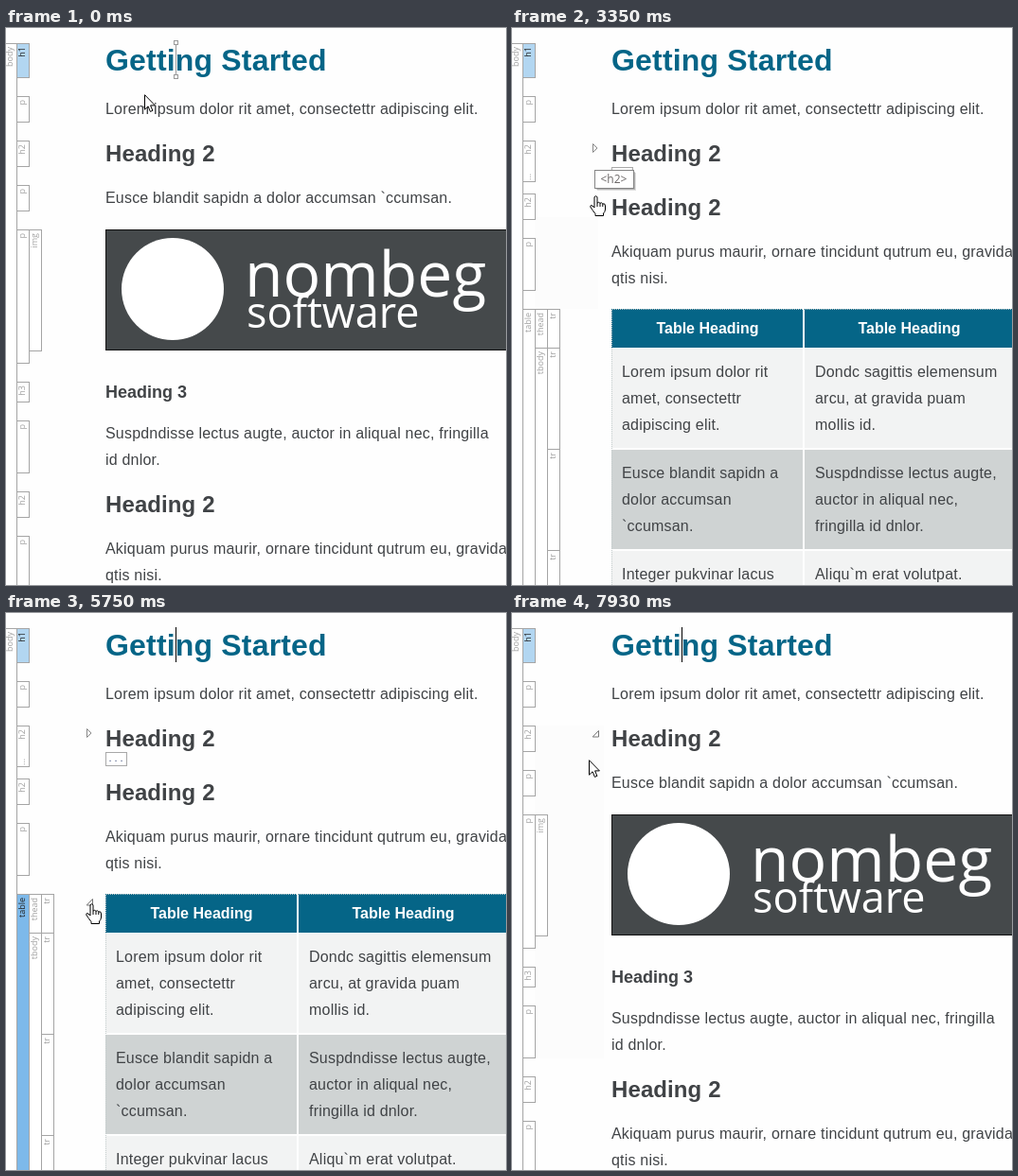
Recreate the animation shown at these times as an HTML page. Size 528 by 589 pixels, loop 8 s.

```html
<!DOCTYPE html>
<html lang="en">
<head>
<meta charset="utf-8">
<title>Collapsing blocks in an editor</title>
<style>
  html, body { margin: 0; width: 100%; height: 100%; overflow: hidden; background: #fefefe; }
  svg { display: block; }
  text { font-family: "Liberation Sans", Arial, sans-serif; fill: #404346; }
  .h1 { font-weight: bold; font-size: 32px; letter-spacing: .18px; fill: #056587; }
  .h2 { font-weight: bold; font-size: 24px; letter-spacing: .1px; }
  .h3 { font-weight: bold; font-size: 18px; }
  .p { font-size: 16px; letter-spacing: .2px; }
  .th { font-weight: bold; font-size: 16px; fill: #fff; text-anchor: middle; }
  .tag { font-family: "Open Sans", "Noto Sans", sans-serif; font-size: 9px; fill: #a0a0a0; }
  .tag.on { fill: #222; }
  .tip { font-family: "Open Sans", "Noto Sans", sans-serif; font-size: 12px; fill: #6c6868; }
  .mark { font-size: 11px; letter-spacing: 3px; fill: #3a4a78; }
  .word { font-family: "Open Sans", "Noto Sans", sans-serif; fill: #fff; }
</style>
</head>
<body>
<svg id="stage" width="528" height="589" viewBox="0 0 528 589"></svg>
<script>
const LOOP = 8000;
const stage = document.getElementById('stage');

// Pointer: time, shape (a = arrow, h = hand), left, top
const pointer = [
  [0, 'a', 146, 70], [370, 'a', 123, 88], [490, 'a', 99, 107],
  [640, 'a', 95, 117], [760, 'a', 87, 128], [880, 'a', 81, 135],
  [1030, 'a', 86, 133], [1150, 'a', 91, 131], [2410, 'a', 89, 129],
  [2530, 'h', 84, 128], [2650, 'h', 82, 127], [3230, 'h', 82, 151],
  [3350, 'h', 82, 177], [3500, 'h', 88, 255], [3650, 'h', 89, 286],
  [3800, 'h', 89, 298], [3920, 'h', 89, 305], [4210, 'h', 87, 306],
  [5040, 'h', 86, 306], [5190, 'h', 84, 307], [6160, 'h', 85, 290],
  [6280, 'a', 87, 245], [6400, 'a', 86, 189], [6540, 'a', 85, 151],
  [6690, 'a', 85, 139], [6810, 'h', 81, 131], [6960, 'h', 81, 129],
  [7080, 'h', 81, 127], [7650, 'h', 81, 129], [7800, 'a', 82, 143],
  [7930, 'a', 81, 155]
];

// Each step changes some parts of the view; hover values are opacities
const steps = [
  [0, { doc: 'open', tree: 'open', caret: 'handle', h2: 0, table: 0, tip: 0, band: null }],
  [760, { h2: .5, band: [108, 471, 86] }],
  [880, { h2: 1 }],
  [1550, { doc: 'shut', caret: 'on' }],
  [1670, { tree: 'shut', h2: 0, band: null }],
  [2260, { caret: 'off' }],
  [2410, { h2: .3 }],
  [2530, { h2: .7 }],
  [2650, { h2: 1 }],
  [2800, { tip: .35 }],
  [2930, { tip: .7, caret: 'on' }],
  [3080, { tip: 1 }],
  [3230, { h2: .5 }],
  [3350, { h2: 0, caret: 'off', band: [200, 297, 91] }],
  [3500, { tip: .5 }],
  [3650, { tip: 0 }],
  [3800, { table: .5, caret: 'on' }],
  [3920, { table: 1 }],
  [4600, { doc: 'folded', tree: 'folded', band: [200, 297, 82] }],
  [5190, { caret: 'off' }],
  [5750, { doc: 'shut', tree: 'shut', caret: 'on', band: null }],
  [6160, { table: .6 }],
  [6280, { table: .3, caret: 'off' }],
  [6400, { table: 0 }],
  [6690, { h2: .5 }],
  [6810, { h2: 1 }],
  [7080, { caret: 'on' }],
  [7380, { doc: 'open', tree: 'open', h2: 0 }],
  [7650, { h2: 1, band: [119, 471, 97] }],
  [7800, { h2: .5 }],
  [7930, { h2: 0 }]
];

const text = (cls, x, y, s, extra = '') => `<text class="${cls}" x="${x}" y="${y}" ${extra}>${s}</text>`;
const rect = (x, y, w, h, fill, extra = '') =>
  `<rect x="${x}" y="${y}" width="${w}" height="${h}" fill="${fill}" ${extra}/>`;
const para = (x, y, ...lines) => lines.map((s, i) => text('p', x, y + 28 * i, s)).join('');
const path = (d, extra) => `<path d="${d}" ${extra}/>`;

// ---- Document ----
const marker = y => rect(105.5, y + .5, 22, 14, '#fff', 'stroke="#a8a8a8"') + text('mark', 108.5, y + 9.5, '...');

const banner = () =>
  rect(105.5, 213.5, 430, 127, '#45494b', 'stroke="#111"') +
  '<circle cx="176" cy="276" r="54" fill="#fff"/>' +
  text('word', 252, 284, 'nombeg', 'font-size="66"') +
  text('word', 254, 317, 'software', 'font-size="45"');

function headRow(h, y) {
  return rect(105, 297, 202, h, '#056587') + rect(309, 297, 219, h, '#056587') +
    text('th', 206.5, y, 'Table Heading') + text('th', 419.5, y, 'Table Heading');
}

const rows = [
  [338, 106, '#f2f3f3', ['Lorem ipsum dolor rit', 'amet, consectettr', 'adipiscing elit.'],
    ['Dondc sagittis elemensum', 'arcu, at gravida puam', 'mollis id.']],
  [446, 105, '#cfd3d3', ['Eusce blandit sapidn a', 'dolor accumsan', '`ccumsan.'],
    ['Suspdndisse lectus augte,', 'auctor in aliqual nec,', 'fringilla id dnlor.']],
  [553, 40, '#f2f3f3', ['Integer pukvinar lacus'], ['Aliqu`m erat volutpat.']]
];

function fullTable() {
  const body = rows.map(([y, h, fill, left, right], i) => {
    const base = [369, 476, 583][i];
    return rect(105, y, 202, h, fill) + rect(309, y, 219, h, fill) +
      para(116, base, ...left) + para(320, base, ...right);
  }).join('');
  return headRow(41, 323) + body +
    path('M105.5 589V297.5H528', 'fill="none" stroke="#c4cccc" stroke-dasharray="1 1"');
}

function documentView(kind) {
  const top = text('h1', 105, 45, 'Getting Started') +
    para(105, 91, 'Lorem ipsum dolor rit amet, consectettr adipiscing elit.') +
    text('h2', 105, 141, 'Heading 2');
  const last = y => text('h2', 105, y, 'Heading 2') +
    para(105, y + 44, 'Akiquam purus maurir, ornare tincidunt qutrum eu, gravida', 'qtis nisi.');
  if (kind === 'open') {
    return top + para(105, 185, 'Eusce blandit sapidn a dolor accumsan `ccumsan.') + banner() +
      text('h3', 105, 390.5, 'Heading 3') +
      para(105, 434, 'Suspdndisse lectus augte, auctor in aliqual nec, fringilla', 'id dnlor.') +
      last(512);
  }
  const table = kind === 'folded' ? headRow(30, 322) + marker(328) : fullTable();
  return top + marker(147) + last(198) + table;
}

// ---- Structure bars ----
function bar(level, y, end, name, { on = 0, fill = '#7db9ea', dots = false } = {}) {
  const x = 11.5 + 13 * level;
  const label = (ty, s, anchor) => text('tag' + (on > .4 ? ' on' : ''), 0, 0, s,
    `text-anchor="${anchor}" transform="translate(${x + 8.5} ${ty}) rotate(-90)"`);
  return rect(x, y + .5, 13, end - y, '#fff', 'stroke="#a5a5a5"') +
    (on ? rect(x + .5, y + 1, 12, end - y - 1, fill, `opacity="${on}"`) : '') +
    label(y + 4, name, 'end') + (dots ? label(end - 1, '...', 'start') : '');
}

const closedMark = y => path(`M85.5 ${y + .5}L90 ${y + 5}L85.5 ${y + 9.5}Z`, 'fill="#fff" stroke="#888"');
const openMark = y => path(`M91.5 ${y + 2.5}V${y + 9}H85.2Z`, 'fill="#fff" stroke="#777"');

function treeView(s) {
  const open = s.tree === 'open', folded = s.tree === 'folded';
  let out = rect(-1.5, 16.5, 13, folded ? 340 : 600, '#fff', 'stroke="#a5a5a5"') +
    text('tag', 0, 0, 'body', 'text-anchor="end" transform="translate(7 20) rotate(-90)"') +
    bar(0, 16, 52, 'h1', { on: 1, fill: '#b2d6f1' }) + bar(0, 72, 99, 'p');
  if (open) {
    out += bar(0, 119, 146, 'h2', { on: s.h2 }) + bar(0, 166, 193, 'p') +
      bar(0, 213, 354, 'p') + bar(1, 213, 341, 'img') + bar(0, 374, 395, 'h3') +
      bar(0, 415, 470, 'p') + bar(0, 490, 517, 'h2') + bar(0, 537, 600, 'p');
    if (s.h2) out += rect(9, 119, 3, 352, '#4a4a4a', `opacity="${s.h2}"`);
    return out + (s.band ? openMark(122) : '');
  }
  out += bar(0, 119, 162, 'h2', { on: s.h2, dots: true }) +
    bar(0, 175, 202, 'h2') + bar(0, 222, 277, 'p') + closedMark(122);
  if (folded) return out + bar(0, 297, 343, 'table', { on: s.table, dots: true }) + closedMark(300);
  out += bar(0, 297, 600, 'table', { on: s.table }) +
    bar(1, 297, 338, 'thead') + bar(1, 338, 600, 'tbody');
  [297, 338, 445, 552, 659].forEach((y, i, all) => {
    if (i < 4) out += bar(2, y, all[i + 1], 'tr');
  });
  return out + (s.table ? openMark(300) : '');
}

// ---- Overlays ----
function caretView(kind) {
  if (kind === 'off') return '';
  if (kind === 'on') return rect(179, 15, 1, 37, '#000');
  const grip = y => rect(177.5, y, 4, 4, '#fff', 'stroke="#999"');
  return rect(179, 15, 1, 37, '#999') + grip(13.5) + grip(49.5);
}

const tipView = alpha => alpha ? `<g opacity="${alpha}">` +
  rect(90, 153, 41, 19, '#000', 'opacity=".12"') + rect(89, 152, 41, 19, '#000', 'opacity=".2"') +
  rect(87.5, 150.5, 41, 19, '#fff', 'stroke="#858585"') +
  text('tip', 93.5, 164, '&lt;h2&gt;') + '</g>' : '';

const shapes = {
  a: 'M.5 .7V16.2L4.1 12.8L6.4 18.4L8.9 17.4L6.6 11.9H11.4Z',
  h: 'M5 1.7Q6.5-.3 8 1.7V8Q9.8 6.5 11 8.3Q12.7 7 13.8 8.9Q16.3 8 16.5 11V15Q16 18 14.5 19V21.5H6V19.5Q2.5 15 .7 12Q.8 9.6 3 11L5 13Z' +
     'M8 8V12M11 8.3V12M13.8 9V12'
};

const pointerView = ([, shape, x, y]) =>
  path(shapes[shape], `transform="translate(${x} ${y})" fill="#fff" stroke="#000" stroke-linejoin="round"`);

const bandView = b => b ? rect(24, b[0], b[2] - 24, b[1] - b[0], '#fcfcfc') : '';

// ---- Playback ----
function draw(t) {
  const past = ([at]) => at <= t;
  const s = Object.assign({}, ...steps.filter(past).map(step => step[1]));
  stage.innerHTML = bandView(s.band) + documentView(s.doc) + treeView(s) +
    caretView(s.caret) + tipView(s.tip) + pointerView(pointer.filter(past).pop());
}

const times = [...new Set([...steps, ...pointer].map(k => k[0]))].sort((a, b) => a - b);
const start = performance.now();
let shown = -1;

function tick() {
  const t = (performance.now() - start) % LOOP;
  const at = times.filter(v => v <= t).pop();
  if (at !== shown) draw(shown = at);
  requestAnimationFrame(tick);
}
tick();
</script>
</body>
</html>
```
